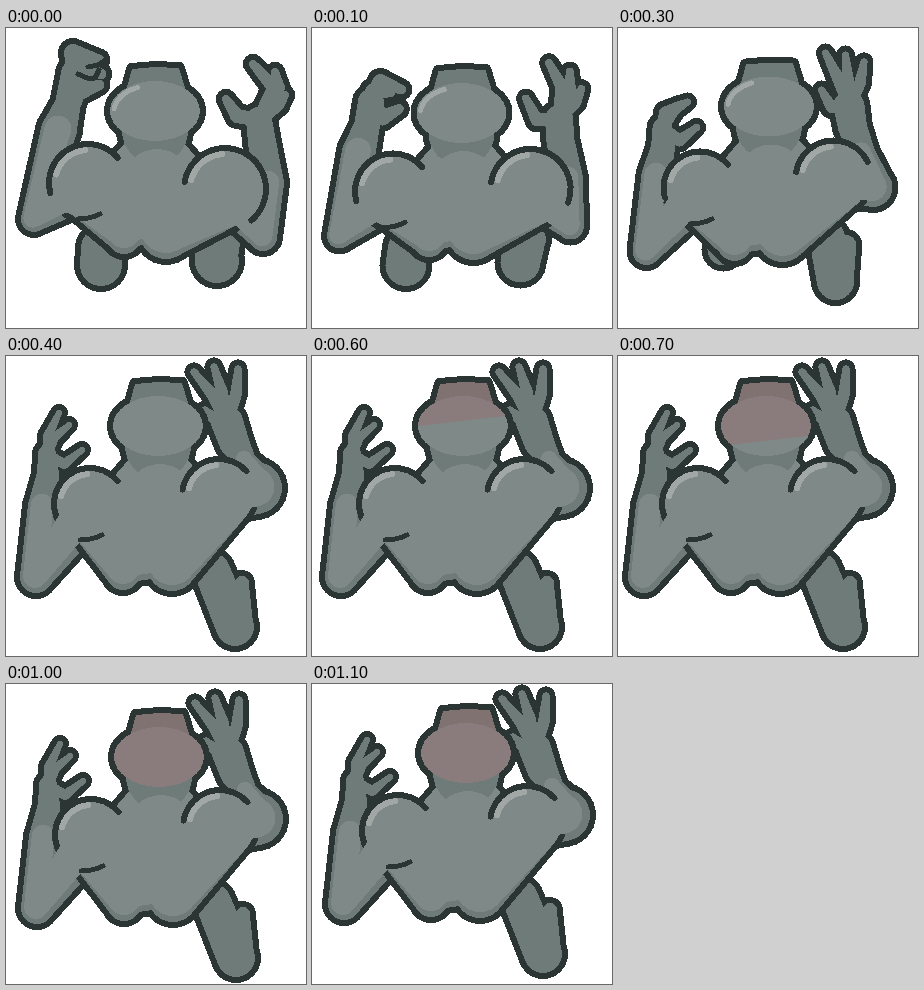
These frames come from a looping animation (300x300 px, 1200 ms). An HTML page:

```html
<!DOCTYPE html>
<html lang="en">
<head>
<meta charset="utf-8">
<title>Flexing figure</title>
<style>
html, body { margin: 0; width: 100%; height: 100%; overflow: hidden; background: #fff; }
svg { display: block; width: 100vw; height: 100vh; }
path { stroke-linecap: round; stroke-linejoin: round; paint-order: stroke; }
</style>
</head>
<body>
<svg viewBox="0 0 300 300" shape-rendering="crispEdges">
  <defs><clipPath id="flush"><polygon id="flushArea"/></clipPath></defs>
  <g id="figure"></g>
</svg>
<script>
const INK = '#2b3634', SKIN = '#7f8987', SHADE = '#6f7b79', SHINE = '#a0a7a5';
const PINK = '#8a7b7c', DARK_PINK = '#7f7271';
const INK_WIDTH = 12; // half of it shows outside the fill

// Skeletons: limb joints are [x, y, radius]; an arm runs elbow, forearm, wrist, palm,
// and each finger is a knuckle followed by a tip.
const poses = [
  {
    head: [149, 83],
    left: {
      shoulder: [82, 155, 36], lobe: [118, 209, 17], thick: 9,
      arm: [[28, 191, 13], [53, 102, 18], [62, 76, 13], [70, 46, 15]],
      fingers: [[[67, 25], [93, 32]], [[76, 40], [95, 46]], [[76, 62], [93, 57]]],
      leg: [[95, 220, 20], [95, 237, 21]]
    },
    right: {
      shoulder: [219, 161, 38], lobe: [160, 205, 26], thick: 7, rim: 410,
      arm: [[257, 209, 14], [263, 155, 15], [256, 114, 14], [253, 92, 13]],
      fingers: [[[231, 88], [220, 71]], [[268, 60], [247, 36]], [[272, 60], [269, 44]], [[272, 76], [279, 67]]],
      leg: [[205, 215, 18], [211, 233, 22], [218, 215, 16]]
    }
  },
  {
    head: [150, 87],
    left: {
      shoulder: [80, 172, 34], lobe: [116, 215, 17], thick: 7,
      arm: [[27, 225, 12], [41, 145, 16], [48, 120, 13], [48, 102, 11]],
      fingers: [[[70, 83], [86, 91]], [[46, 87], [62, 83]], [[65, 117], [81, 105]]],
      leg: [[95, 220, 18], [93, 238, 20]]
    },
    right: {
      shoulder: [218, 161, 36], lobe: [163, 207, 26], thick: 6, rim: 350,
      arm: [[260, 187, 13], [249, 146, 15], [241, 112, 14], [241, 90, 15]],
      fingers: [[[219, 96], [208, 70]], [[232, 58], [227, 34]], [[243, 62], [247, 43]], [[254, 72], [260, 55]]],
      leg: [[212, 205, 18], [206, 236, 18], [220, 208, 14]]
    }
  },
  {
    head: [152, 70],
    left: {
      shoulder: [84, 148, 33], lobe: [117, 217, 17], thick: 5,
      arm: [[30, 221, 16], [37, 150, 15], [42, 118, 11], [41, 98, 9]],
      fingers: [[[42, 80], [53, 57]], [[48, 82], [63, 69]], [[58, 108], [76, 94]]],
      leg: [[115, 200, 12], [118, 205, 12]]
    },
    right: {
      shoulder: [213, 140, 34], lobe: [166, 210, 25], thick: 6, rim: 318,
      arm: [[250, 132, 26], [239, 104, 11], [228, 86, 15], [221, 66, 16]],
      fingers: [[[208, 62], [199, 54]], [[206, 38], [188, 16]], [[216, 36], [208, 11]], [[230, 38], [232, 13]]],
      leg: [[206, 215, 18], [229, 271, 19], [236, 227, 7]]
    }
  }
];
const shakes = [[1, 1], [-1, 0], [-4, 0], [2, 0], [-2, -1], [1, 3], [2, -1]];

function mix(a, b, t) {
  if (typeof a === 'number') return a + (b - a) * t;
  if (Array.isArray(a)) return a.map((v, i) => mix(v, b[i], t));
  return Object.fromEntries(Object.keys(a).map(k => [k, mix(a[k], b[k], t)]));
}

// All outlines run clockwise, so overlapping ones merge into one silhouette.
const polygon = points => 'M' + points.join('L') + 'Z';
const ellipse = (x, y, rx, ry = rx) =>
  `M${x - rx},${y}a${rx},${ry} 0 1 1 ${2 * rx},0a${rx},${ry} 0 1 1 ${-2 * rx},0Z`;

function chain(nodes) {
  let d = '';
  nodes.forEach(([x, y, r], i) => {
    d += ellipse(x, y, r);
    if (!i) return;
    const [px, py, pr] = nodes[i - 1];
    const len = Math.hypot(x - px, y - py) || 1;
    const nx = (py - y) / len, ny = (x - px) / len;
    d += polygon([[px - nx * pr, py - ny * pr], [x - nx * r, y - ny * r],
                  [x + nx * r, y + ny * r], [px + nx * pr, py + ny * pr]]);
  });
  return d;
}

function arc([x, y], rx, ry, from, to) {
  const at = deg => {
    const a = deg * Math.PI / 180;
    return [x + rx * Math.cos(a), y + ry * Math.sin(a)];
  };
  return `M${at(from)}A${rx},${ry} 0 ${to - from > 180 ? 1 : 0} 1 ${at(to)}`;
}

const figure = document.getElementById('figure');
const flushArea = document.getElementById('flushArea');

function layer(fill, stroke = 'none', width = 0) {
  const node = document.createElementNS('http://www.w3.org/2000/svg', 'path');
  node.setAttribute('fill', fill);
  node.setAttribute('stroke', stroke);
  node.setAttribute('stroke-width', width);
  figure.append(node);
  return node;
}

const layers = {
  legs: layer(SHADE, INK, INK_WIDTH),
  arms: layer(SHADE, INK, INK_WIDTH),
  body: layer(SHADE, INK, INK_WIDTH),
  upperArms: layer(SKIN),
  chest: layer(SKIN),
  neck: layer(SHADE),
  collar: layer(SKIN),
  cap: layer(SHADE),
  head: layer(SKIN),
  capFlush: layer(DARK_PINK),
  headFlush: layer(PINK),
  shine: layer('none', SHINE, 6),
  headShine: layer('none', SHINE, 5),
  rims: layer('none', INK, 6),
  creases: layer('none', INK, 5)
};
for (const name of ['capFlush', 'headFlush']) layers[name].setAttribute('clip-path', 'url(#flush)');

const resize = ([x, y], r) => [x, y, r];
const shrink = nodes => nodes.map(([x, y, r]) => [x - 1, y - 1, r * .75]);
const upperArm = side => [resize(side.shoulder, 25), ...side.arm.slice(0, 2)];

function armPath(side) {
  const palm = side.arm[3];
  return chain([...upperArm(side), ...side.arm.slice(2)]) + side.fingers.map(([knuckle, tip]) =>
    chain([resize(palm, side.thick), resize(knuckle, side.thick), resize(tip, side.thick * .6)])).join('');
}

function torsoPath(head, sides, lift) {
  const lobes = sides.map(({ lobe: [x, y, r] }) => [x, y - lift, r]);
  const [l, r] = sides.map(side => side.shoulder.slice(0, 2));
  return sides.map((side, i) => chain([side.shoulder, lobes[i]])).join('')
    + chain(lobes.map(lobe => resize(lobe, 10)))
    + polygon([l, head, r, lobes[1].slice(0, 2), lobes[0].slice(0, 2)]);
}

function paint({ head, left, right }, hasShine, isFist) {
  const sides = [left, right];
  const [hx, hy] = head;
  const headPath = ellipse(hx, hy, 45, 30);
  const capPath = polygon([[hx - 29, hy - 20], [hx - 23, hy - 42], [hx, hy - 44],
                           [hx + 24, hy - 43], [hx + 31, hy - 20]]);
  const neckPath = chain([[hx, hy + 8, 33], [hx, hy + 20, 33]]);
  const join = make => sides.map(make).join('');
  const [sx, sy] = left.shoulder;

  const paths = {
    legs: join(side => chain(side.leg)),
    arms: join(armPath),
    body: torsoPath(head, sides, 0) + neckPath + headPath + capPath,
    upperArms: join(side => chain(shrink(upperArm(side)))),
    chest: torsoPath(head, sides, 6),
    neck: neckPath,
    collar: ellipse(hx + 2, hy + 72, 34),
    cap: capPath,
    head: headPath,
    capFlush: capPath,
    headFlush: headPath,
    shine: join(({ shoulder }) => arc(shoulder, shoulder[2] - 3, shoulder[2] - 3, 195, 265)),
    headShine: hasShine ? arc(head, 41, 26, 185, 245) : '',
    rims: arc(left.shoulder, left.shoulder[2] + 3, left.shoulder[2] + 3, 165, 320)
      + arc(right.shoulder, right.shoulder[2] + 3, right.shoulder[2] + 3, 190, right.rim),
    creases: `M${sx - 10},${sy + 36}q12,0 22,-5`
      + (isFist ? 'M72,46l9,4 8,0 4,-8M82,39l10,-2 9,-6' : '')
  };
  for (const name in paths) layers[name].setAttribute('d', paths[name]);
}

function draw(ms) {
  const step = Math.floor(ms % 1200 / 100);
  const pose = Math.min(2, step / 2), from = Math.min(1, Math.floor(pose));
  paint(mix(poses[from], poses[from + 1], pose - from), pose < 2, pose < .5);

  const [dx, dy] = step > 4 ? shakes[step - 5] : [0, 0];
  figure.setAttribute('transform', `translate(${dx} ${dy})`);
  const depth = step > 7 ? 140 : step > 4 ? 45 + 20 * (step - 5) : -20;
  flushArea.setAttribute('points', `90,-20 210,-20 210,${depth - 7} 90,${depth + 7}`);
}

const start = performance.now();
function tick() {
  draw(performance.now() - start);
  requestAnimationFrame(tick);
}
tick();
</script>
</body>
</html>
```
